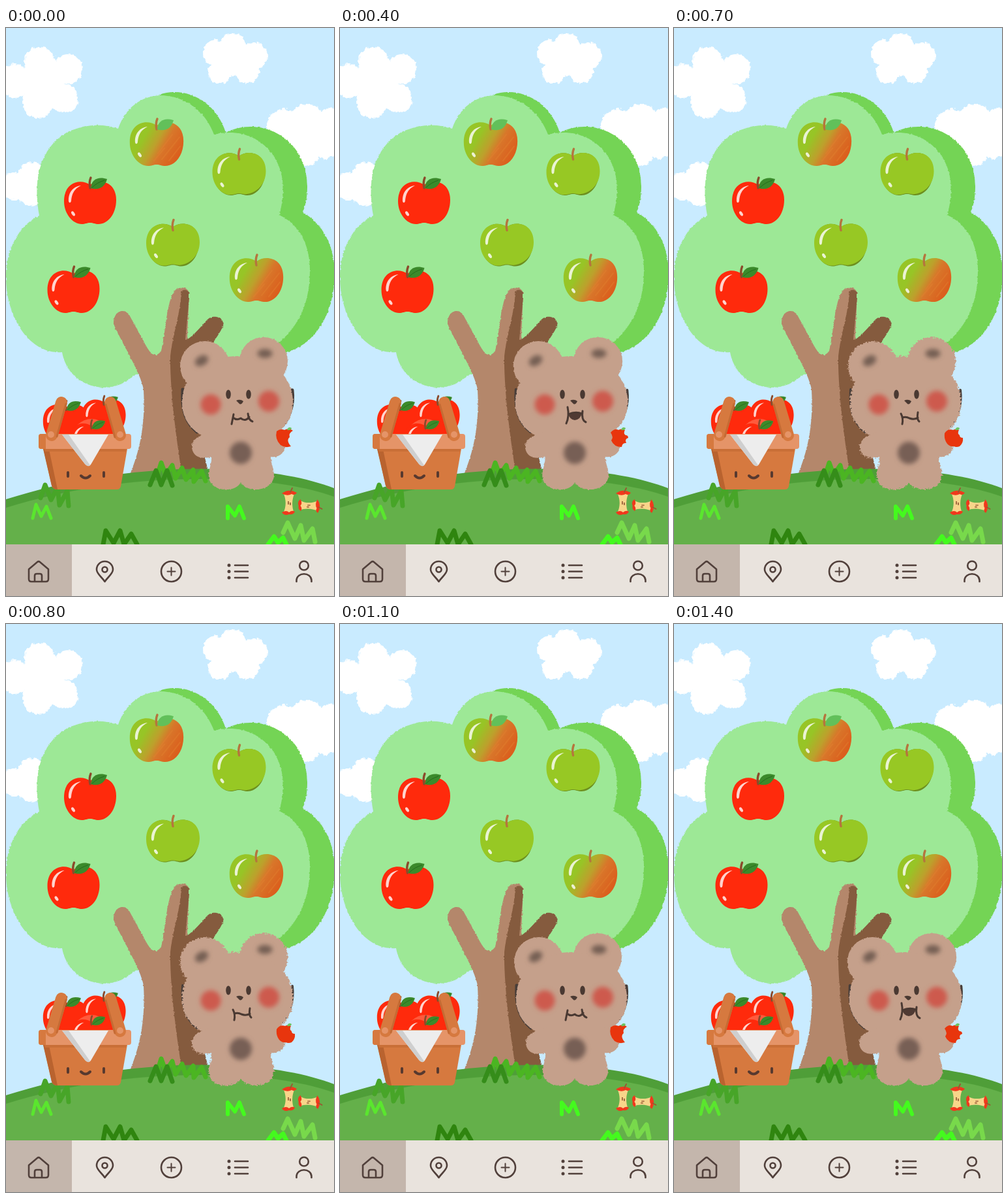
Animation, 503 px wide and 869 px high, one loop 1.5 s. Source, as an HTML page:

```html
<!DOCTYPE html>
<html lang="en">
<head>
<meta charset="utf-8">
<title>Apple tree bear</title>
<style>
  html, body { margin: 0; height: 100%; overflow: hidden; background: #c9ebff; }
  svg { display: block; width: 100vw; height: 100vh; }
  .line { fill: none; stroke-linecap: round; stroke-linejoin: round; }
  .pose { visibility: hidden; }
  .pose.on { visibility: visible; }
</style>
</head>
<body>
<svg viewBox="0 0 503 869" preserveAspectRatio="none">
  <defs>
    <filter id="chalk" color-interpolation-filters="sRGB">
      <feTurbulence type="fractalNoise" baseFrequency=".16" numOctaves="2" seed="4"/>
      <feDisplacementMap in="SourceGraphic" scale="7" xChannelSelector="R" yChannelSelector="G"/>
      <feGaussianBlur stdDeviation=".7"/>
    </filter>
    <filter id="soft" color-interpolation-filters="sRGB">
      <feTurbulence type="fractalNoise" baseFrequency=".3" numOctaves="2" seed="8"/>
      <feDisplacementMap in="SourceGraphic" scale="3" xChannelSelector="R" yChannelSelector="G"/>
    </filter>
    <filter id="fuzz" color-interpolation-filters="sRGB">
      <feTurbulence type="fractalNoise" baseFrequency=".35" numOctaves="2" seed="2"/>
      <feDisplacementMap in="SourceGraphic" scale="7" xChannelSelector="R" yChannelSelector="G"/>
    </filter>
    <filter id="blur" x="-60%" y="-60%" width="220%" height="220%"><feGaussianBlur stdDeviation="3.6"/></filter>
    <linearGradient id="ripe" x1=".1" y1=".25" x2=".95" y2=".65">
      <stop offset=".2" stop-color="#97c526"/>
      <stop offset=".48" stop-color="#bda02c"/>
      <stop offset=".66" stop-color="#d8762a"/>
      <stop offset="1" stop-color="#db5f1d"/>
    </linearGradient>

    <path id="body" d="M0-27C-14-37-40-32-40-2C-40 18-26 33-13 33C-7 33-5 31 0 31S7 33 13 33C27 33 40 18 40-4C40-33 13-37 0-27Z"/>
    <g id="shine" fill="#fff" opacity=".8">
      <path d="M-33-2C-34-16-25-25-14-26C-24-21-28-14-29-3C-29 0-32 2-33-2Z"/>
      <ellipse cx="-26" cy="17" rx="2.2" ry="4" transform="rotate(-35 -26 17)"/>
    </g>
    <path id="stem" class="line" d="M0-22Q-2-31 1-38" stroke-width="3.4"/>
    <path id="leaf" d="M1-22C2-37 14-40 26-36C23-24 13-18 1-22Z"/>
    <g id="red">
      <use href="#body" fill="#ff2a0c"/><use href="#shine"/>
      <use href="#stem" stroke="#8b4a2b"/><use href="#leaf" fill="#3b8a2b"/>
      <path class="line" d="M3-23Q11-31 22-34" stroke="#256c1c"/>
    </g>
    <g id="green">
      <use href="#body" fill="#6d8f1e"/>
      <path d="M0-27C-14-37-41-32-41-2C-41 18-26 33-13 32C-7 32-5 30 0 30S7 32 12 31C27 29 41 16 41-4C41-33 13-37 0-27Z" fill="#97c824"/>
      <use href="#shine"/><use href="#stem" stroke="#b5753d"/>
    </g>
    <g id="turning">
      <use href="#body" fill="url(#ripe)" transform="scale(1.03)"/>
      <path class="line" d="M2 15L24-14M8 24L35-10M19 26L36 4M-4 26L12 7" stroke="#e1812f" stroke-width="2" opacity=".45"/>
      <use href="#shine"/><use href="#stem" stroke="#b5753d"/>
    </g>

    <g id="fur" fill="#c5a08b">
      <circle cx="305" cy="517" r="38"/><circle cx="395" cy="510" r="37"/>
      <path d="M355 502C403 502 440 529 440 573C440 614 403 635 355 635C306 635 270 614 270 573C270 529 307 502 355 502Z"/>
      <path d="M318 617C302 620 284 628 285 642C287 658 302 660 315 656C316 667 310 676 311 687C313 710 352 712 360 695C369 712 409 710 411 685C411 673 406 666 406 656C420 658 430 648 429 634C428 619 410 617 400 617Z"/>
    </g>
    <g id="face">
      <g filter="url(#blur)">
        <ellipse cx="300" cy="509" rx="11" ry="7.5" transform="rotate(-30 300 509)" fill="#755e52"/>
        <ellipse cx="397" cy="498" rx="11.5" ry="7" fill="#755e52"/>
        <circle cx="314" cy="576" r="15.5" fill="#cd5a4e"/>
        <circle cx="403" cy="571" r="16" fill="#cd5a4e"/>
        <ellipse cx="360" cy="650" rx="17" ry="17" fill="#775f55"/>
      </g>
      <g fill="#4a3932">
        <ellipse cx="341" cy="560.500" rx="3.800" ry="7"/>
        <ellipse cx="372" cy="560.500" rx="3.800" ry="7"/>
        <path d="M353 570Q359 567 364 571Q361 577 358 575Z"/>
      </g>
    </g>
    <path id="sides" class="line" stroke="#493e39" d="M271 553C269 585 276 604 293 618M439 554C442 578 434 597 423 609"/>
    <path id="bite-leaf" d="M431 615Q433 609 438 612Q437 616 431 615Z" fill="#6cc25d"/>
  </defs>

  <rect width="503" height="869" fill="#c9ebff"/>

  <g fill="#fff" filter="url(#chalk)">
    <circle cx="57" cy="84" r="32"/><circle cx="52" cy="53" r="24"/><circle cx="95" cy="63" r="23"/>
    <circle cx="89" cy="108" r="22"/><circle cx="49" cy="114" r="24"/><circle cx="13" cy="81" r="26"/>
    <circle cx="350" cy="48" r="24"/><circle cx="348" cy="28" r="20"/><circle cx="380" cy="43" r="21"/>
    <circle cx="370" cy="67" r="18"/><circle cx="328" cy="67" r="18"/><circle cx="322" cy="38" r="20"/>
    <circle cx="458" cy="159" r="30"/><circle cx="461" cy="141" r="25"/><circle cx="497" cy="149" r="26"/>
    <circle cx="425" cy="149" r="25"/><circle cx="456" cy="185" r="27"/><circle cx="490" cy="178" r="22"/>
    <circle cx="41" cy="229" r="24"/><circle cx="13" cy="242" r="21"/><circle cx="38" cy="250" r="22"/>
  </g>

  <g filter="url(#soft)">
    <path fill="#74d455" d="M235 102C274 88 322 111 337 160C391 133 463 169 462 244Q462 266 455 282C488 300 505 338 504 378C503 438 474 486 425 498L300 500V140Z"/>
    <path fill="#9de896" d="M172 154C183 122 207 104 237 103C276 104 306 128 319 163C381 148 426 193 425 247Q424 270 419 286C450 300 467 334 466 372C466 427 444 469 397 496L290 530H198C184 543 169 550 150 550C119 549 92 530 86 496C36 500 0 442 0 381C0 340 19 302 51 287C40 230 54 178 99 157Q137 142 172 154Z"/>
    <path fill="#b4876b" d="M187 690C205 650 214 607 211 553C205 524 180 487 165 453C164 434 180 427 189 439L217 490Q228 508 238 494C245 466 246 423 256 407C263 393 281 395 281 408L268 690Z"/>
    <path fill="#855b3e" d="M269 403C275 397 282 403 281 411L275 477Q281 478 307 448C317 436 336 443 333 456C322 479 304 494 302 517V645L313 690H271C262 635 251 554 252 502C256 466 267 440 269 403Z"/>
  </g>

  <use href="#turning" x="231" y="177"/>
  <use href="#leaf" x="231" y="177" fill="#62c05a"/>
  <use href="#green" x="357.500" y="223"/>
  <use href="#red" x="129" y="267"/>
  <use href="#green" x="256" y="331.500"/>
  <use href="#red" x="103.500" y="403"/>
  <use href="#turning" x="384" y="385"/>

  <path fill="#4f9e38" d="M0 721C130 680 250 672 330 675S460 688 503 704V790H0Z"/>
  <path fill="#64b04a" d="M0 734C130 694 240 689 320 690S460 702 503 717V790H0Z"/>

  <g class="line" stroke-width="7">
    <path stroke="#4bb522" d="M233 681L238 665L245 684L255 669L260 689L270 673L276 691L287 676L288 694L300 678L306 693"/>
    <path stroke="#358d1a" d="M221 699L230 677L238 699L247 677L255 700"/>
    <path stroke="#47a528" d="M53 719L60 699L69 722L79 703L82 730L94 708L96 731"/>
    <path stroke="#5ae62e" stroke-width="5" d="M41 750L46 729L54 747L62 732L69 750"/>
    <path stroke="#44fa1e" stroke-width="6" d="M340 750V732L351 746L358 732L365 750"/>
    <path stroke="#78d94b" d="M425 772L432 757L443 781L452 761L457 784L470 766L474 786"/>
    <path stroke="#44fa1e" d="M402 790L411 778L417 787L425 780L430 790"/>
    <path stroke="#2f850f" d="M149 790L153 769L165 788L175 769L181 790L192 774L201 790"/>
  </g>

  <g id="core" transform="translate(434 727)">
    <path fill="#f8d58a" d="M-9-16H9C4-6 4 6 8 15H-9C-4 6-4-6-9-16Z"/>
    <path fill="#f0381c" d="M-11-15Q0-23 12-16Q9-11 4-14Q-3-10-11-15ZM-11 14Q-4 10 0 14Q5 10 9 13Q7 18 0 17Q-7 20-11 14Z"/>
    <path class="line" d="M2-17L5-23" stroke="#9a5931" stroke-width="2"/>
    <path d="M-1-3v5M2-1v4" stroke="#8b4a2b" stroke-width="1.500"/>
  </g>
  <use href="#core" transform="translate(464 731) rotate(91) scale(.9) translate(-434 -727)"/>

  <g id="basket">
    <use href="#red" transform="translate(92 604) scale(.88)"/>
    <use href="#red" transform="translate(150 595) scale(.84)"/>
    <circle cx="131" cy="627" r="29" fill="#ff5a3c"/>
    <use href="#red" transform="translate(131 631) scale(.82)"/>
    <path fill="#d6793f" d="M56 638H187L176 701Q175 706 170 706H78Q72 706 70 700Z"/>
    <path fill="#b9632f" d="M56 640H65L79 706Q72 706 70 700Z"/>
    <path fill="#c96f37" d="M58 643H185L184 648H60Z"/>
    <rect x="50" y="621" width="142" height="23" rx="4" fill="#e59468"/>
    <path fill="#d6793f" d="M50 625q0-4 4-4h7v23h-7q-4 0-4-4Z"/>
    <path fill="#ededed" d="M86 622H157L130 668Q126 673 121 667Z"/>
    <path fill="#cfcfcf" d="M86 622H96L129 669Q125 672 121 667Z"/>
    <path class="line" stroke="#d6793f" stroke-width="18" d="M85 573L70 623M160 573L175 623"/>
    <path class="line" stroke="#c56b34" stroke-width="3" d="M92 575L78 625M153 576L167 626"/>
    <circle cx="69" cy="622" r="5" fill="#e59468"/><circle cx="175" cy="622" r="5" fill="#e59468"/>
    <path class="line" stroke="#57392f" stroke-width="4" d="M95 680v6M150 680v6M115 685Q122 692 129 685"/>
  </g>

  <g class="pose">
    <use href="#sides" stroke-width="5"/>
    <use href="#fur" filter="url(#soft)"/><use href="#face"/>
    <path class="line" stroke="#4a3932" stroke-width="3" d="M349 591L346 606M348 596Q354 601 360 597Q367 603 373 595M371 590Q372 600 378 602"/>
    <path fill="#e8350d" d="M415 617Q421 612 427 615Q434 611 440 616Q433 620 435 626Q429 631 437 640Q428 643 421 638Q412 629 415 617Z"/>
    <use href="#bite-leaf"/>
  </g>
  <g class="pose">
    <use href="#sides" stroke-width="4"/>
    <use href="#fur" filter="url(#fuzz)"/><use href="#face"/>
    <path class="line" stroke="#4a3932" stroke-width="3" d="M348 590Q352 597 350 606M350 596Q356 594 361 597Q368 600 374 596M374 588Q372 599 376 602"/>
    <path fill="#e8350d" d="M415 620Q420 612 428 615Q433 612 437 615Q434 620 438 623Q438 627 443 627Q444 635 438 640Q433 642 429 640Q421 641 417 633Q414 627 415 620Z"/>
    <use href="#bite-leaf"/>
  </g>
  <g class="pose">
    <g transform="translate(-5.300 0) scale(1.015 1)">
      <use href="#sides" stroke-width="4"/>
      <use href="#fur" filter="url(#soft)"/>
    </g>
    <use href="#face"/>
    <path fill="#503a33" d="M350 590Q360 585 371 589Q369 599 360 600Q352 599 350 590Z"/>
    <path class="line" stroke="#4a3932" stroke-width="3" d="M349 580Q352 594 347 605M350 591Q361 586 371 590M372 586Q370 600 377 603"/>
    <path fill="#e8350d" d="M415 619Q421 612 427 615Q432 612 437 615Q434 620 438 623Q442 623 442 627Q436 629 439 635Q433 634 432 641Q420 641 416 631Q420 626 415 619Z"/>
    <use href="#bite-leaf"/>
  </g>

  <rect y="790" width="503" height="79" fill="#e9e3dd"/>
  <rect y="790" width="101" height="79" fill="#c4b6ac"/>
  <g class="line" stroke="#51403b" stroke-width="2.600">
    <path d="M35 828L48 817Q50 815 52 817L65 828V843Q65 847 61 847H39Q35 847 35 843ZM44 847V838Q44 835 47 835H52Q55 835 55 838V847"/>
    <path d="M151.500 847C147 840 139 835 139 828.500A12.500 12.500 0 0 1 164 828.500C164 835 156 840 151.500 847Z"/>
    <circle cx="151.500" cy="828.500" r="4"/>
    <circle cx="253.500" cy="831.500" r="15.500"/>
    <path d="M247.500 831.500h12M253.500 825.500v12" stroke-width="2"/>
    <path d="M351 822h20M351 831.500h20M351 841h20"/>
    <path d="M342 822h0M342 831.500h0M342 841h0" stroke-width="5"/>
    <circle cx="457" cy="822.500" r="6.800"/>
    <path d="M445.500 847V845C446 832 468 832 468.500 845V847"/>
  </g>
</svg>
<script>
  const STEP = 100;
  const CHEW = [0, 0, 1, 1, 2];
  const poses = document.querySelectorAll('.pose');
  const start = performance.now();

  function draw(now) {
    const step = Math.floor(Math.max(0, now - start) / STEP) % CHEW.length;
    poses.forEach((pose, i) => pose.classList.toggle('on', i === CHEW[step]));
    requestAnimationFrame(draw);
  }
  draw(start);
</script>
</body>
</html>
```
